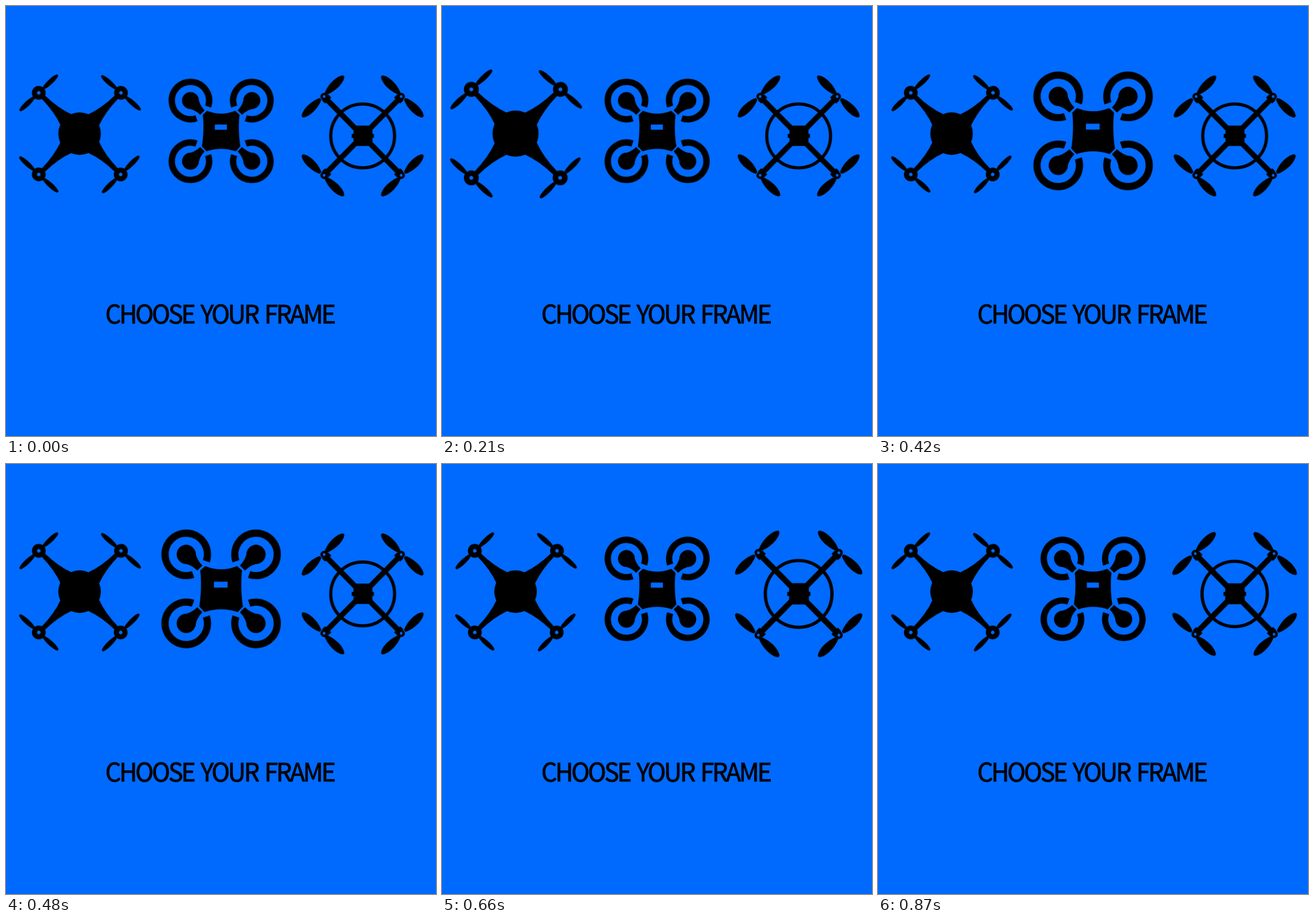
Write an HTML page that moves like this. It is 748 px wide and 748 px high and loops after 0.9 s.

```html
<!DOCTYPE html>
<html lang="en">
<head>
<meta charset="utf-8">
<title>Choose your frame</title>
<style>
  html, body { margin: 0; width: 100%; height: 100%; overflow: hidden; background: #006aff; }
  svg { display: block; width: 100vw; height: 100vh; }
  text {
    font: 43px "Noto Sans CJK JP", "Noto Sans CJK SC", "Open Sans", sans-serif;
    letter-spacing: -3.2px;
    word-spacing: 5px;
    stroke: #000;
    stroke-width: .9;
  }
  .hole { fill: #006aff; }
  .line { fill: none; stroke: #000; }

  /* Each drone takes its turn: five steps up, five steps down. */
  .pulse { animation: pulse 900ms var(--delay) infinite; }
  @keyframes pulse {
    0% { transform: scale(1); animation-timing-function: steps(5); }
    16.666% { transform: scale(var(--peak)); animation-timing-function: steps(5); }
    33.333%, 100% { transform: scale(1); }
  }
</style>
</head>
<body>
<svg viewBox="0 0 748 748">
  <defs>
    <path id="slim" d="M9-1.5C18-5 37-5.5 45-1.7Q46 0 45 1.7C37 5.5 18 5 9 1.5Z"/>
    <g id="rotor">
      <use href="#slim"/>
      <use href="#slim" transform="scale(-1)"/>
      <circle r="12"/>
      <circle class="hole" r="3"/>
    </g>
    <path id="arm" d="M34-13.5Q58-4.5 90-4V4Q58 4.5 34 13.5Z"/>

    <g id="pod" transform="translate(-53.4 -52.8) rotate(45)">
      <path class="line" stroke-width="11" d="M29.2 14.3A32.5 32.5 0 1 1 29.2-14.3"/>
      <circle r="14.7"/>
      <path d="M6-13.4Q15.5-5.6 29.5-5.4V5.4Q15.5 5.6 6 13.4Z"/>
    </g>

    <path id="wide" d="M6-2C20-9 42-9 50.3-1.8Q51.5 0 50.3 1.8C42 9 20 9 6 2Z"/>
    <g id="boom">
      <path class="line" stroke-width="9.5" d="M0 0L-66-67"/>
      <g transform="translate(-69 -68.7) rotate(-44.6)">
        <use href="#wide"/>
        <use href="#wide" transform="scale(-1)"/>
      </g>
      <g transform="translate(-67 -68.5) rotate(45)">
        <circle r="6.5"/>
        <path d="M2-7.5H10V7.5H2Z"/>
        <circle class="hole" r="2.3"/>
      </g>
    </g>
  </defs>

  <rect width="748" height="748" fill="#006aff"/>

  <g transform="translate(128.5 222)">
    <g class="pulse" style="--peak: 1.14; --delay: 0ms">
      <circle cx="-.5" r="37"/>
      <use href="#arm" transform="rotate(45)"/>
      <use href="#arm" transform="rotate(135)"/>
      <use href="#arm" transform="rotate(225)"/>
      <use href="#arm" transform="rotate(315)"/>
      <use href="#rotor" transform="translate(-71.5 -71) rotate(-43.5)"/>
      <use href="#rotor" transform="translate(71.5 -71) rotate(41.5)"/>
      <use href="#rotor" transform="translate(-71.5 71) rotate(42.5)"/>
      <use href="#rotor" transform="translate(71 71) rotate(-45)"/>
    </g>
  </g>

  <g transform="translate(374.2 217.2)">
    <g class="pulse" style="--peak: 1.171; --delay: -600ms">
      <path d="M-24.5-35Q0-25 24.5-35L32-28C30-13 30.5 10 33.5 27L25.5 35.5Q0 27-25.5 35.5L-33.5 27C-30.5 10-30-13-32-28Z"/>
      <path class="hole" d="M-11-11H10V-2H-11Z"/>
      <use href="#pod"/>
      <use href="#pod" transform="scale(-1 1)"/>
      <use href="#pod" transform="scale(1 -1)"/>
      <use href="#pod" transform="scale(-1)"/>
    </g>
  </g>

  <g transform="translate(620.4 226)">
    <g class="pulse" style="--peak: 1.1125; --delay: -300ms">
      <circle class="line" r="55.5" stroke-width="5.5"/>
      <rect x="-16" y="-18" width="33" height="35.5" rx="2"/>
      <rect x="-19" y="-3.5" width="38.5" height="7"/>
      <use href="#boom"/>
      <use href="#boom" transform="scale(-1 1)"/>
      <use href="#boom" transform="scale(1 -1)"/>
      <use href="#boom" transform="scale(-1)"/>
    </g>
  </g>

  <text x="172.7" y="551.5">CHOOSE YOUR FRAME</text>
</svg>
</body>
</html>
```
